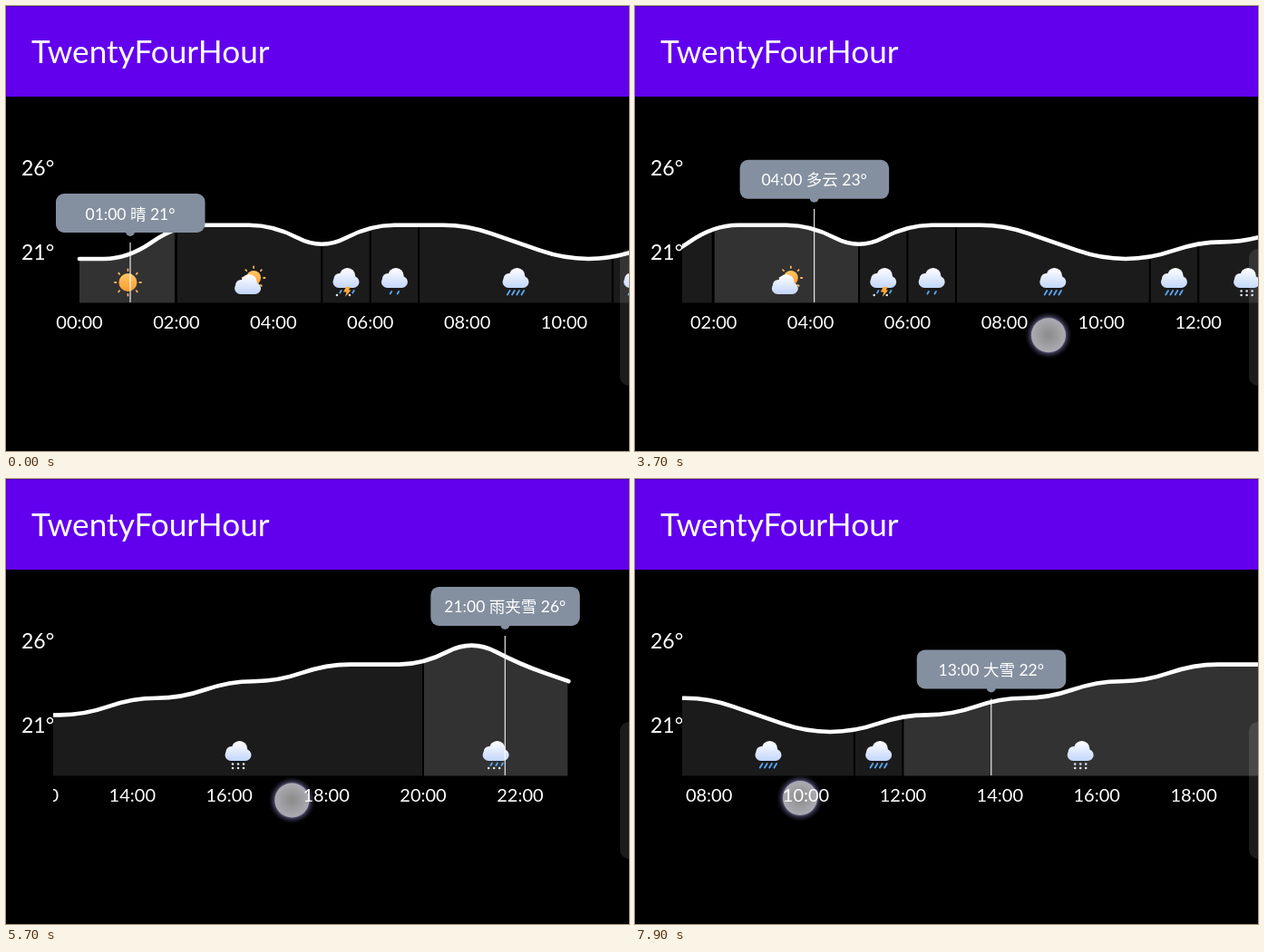
Write an HTML page with a canvas that moves like this. It is 687 px wide and 491 px high and loops after 8 s.

```html
<!DOCTYPE html>
<html lang="zh">
<head>
<meta charset="utf-8">
<style>
html, body { margin: 0; width: 100%; height: 100%; overflow: hidden; background: #000; }
canvas { display: block; }
</style>
</head>
<body>
<canvas id="stage" width="687" height="491"></canvas>
<script>
const ctx = document.getElementById('stage').getContext('2d');
const W = 687, H = 491, LEFT = 52, BASE = 327, HOUR = 53.45, ORIGIN = 81;
const LOOP = 8000, MAX_SCROLL = 690, TWEEN = 120;
const FONT = 'Lato, "Noto Sans CJK SC", "Noto Sans CJK", sans-serif';

// One digit per hour: half degrees above 21
const temps = [...'004441444200224466888b86'].map(c => 21 + parseInt(c, 36) / 2);
const sections = [
  [0, 2, '晴', sunny], [2, 5, '多云', cloudy], [5, 6, '雷阵雨', thunder],
  [6, 7, '小雨', drizzle], [7, 11, '中雨', rain], [11, 12, '大雨', rain],
  [12, 20, '大雪', snow], [20, 23, '雨夹雪', sleet]
];

const easeIn = k => k ** 3;
const easeOut = p => k => 1 - (1 - k) ** p;
const smooth = k => k * k * (3 - 2 * k);

// Touches move from (x, y) along legs [start, end, x, y, ease]
const tap = { from: 2600, to: 3200, x: 382, y: 384, legs: [[2600, 3200, 438, 390, easeIn]] };
const drag = { from: 3500, to: 5000, x: 560, y: 355, legs: [[3500, 4700, 52, 395, easeOut(1.25)]] };
const sweep = { from: 5200, to: 7600, x: 626, y: 322, legs: [
  [5200, 5750, 215, 365, easeIn], [5780, 6700, 471, 344, easeOut(2)], [6700, 7500, 693, 341, smooth]] };
const press = { from: 7900, to: LOOP, x: 182, y: 352, legs: [] };

const clamp = (v, a, b) => Math.max(a, Math.min(b, v));
const tempY = t => 279 - (t - 21) * 18.6;

function touchAt({ x, y, legs }, t) {
  for (const [start, end, toX, toY, ease] of legs) {
    const k = ease(clamp((t - start) / (end - start), 0, 1));
    x += (toX - x) * k;
    y += (toY - y) * k;
  }
  return [x, y];
}

function scrollAt(t) {
  if (t < sweep.from) return 0.973 * (drag.x - touchAt(drag, t)[0]);
  return clamp(1120 - touchAt(sweep, t)[0], 0, MAX_SCROLL);
}

const cursorX = s => 137 + 0.599 * s;
const hourAt = s => clamp(Math.floor((cursorX(s) + s - ORIGIN) / HOUR), 0, 23);

// A linear tween after each hour change is a moving average of the targets
function markerY(t) {
  let sum = 0;
  for (let i = 0; i < 30; i++) {
    const hour = hourAt(scrollAt(Math.max(0, t - (i + 0.5) * TWEEN / 30)));
    sum += tempY(Math.floor(temps[hour]));
  }
  return sum / 30 - 18;
}

function text(str, x, y, size, align = 'center') {
  ctx.font = size + 'px ' + FONT;
  ctx.textAlign = align;
  ctx.fillStyle = '#fff';
  ctx.fillText(str, x, y);
}

function box(x, y, w, h, r, fill) {
  ctx.fillStyle = fill;
  ctx.beginPath();
  ctx.roundRect(x, y, w, h, r);
  ctx.fill();
}

function dot(x, y, r, fill) {
  ctx.fillStyle = fill;
  ctx.beginPath();
  ctx.arc(x, y, r, 0, 7);
  ctx.fill();
}

function stroke(x1, y1, x2, y2, color, width) {
  ctx.strokeStyle = color;
  ctx.lineWidth = width;
  ctx.lineCap = 'round';
  ctx.beginPath();
  ctx.moveTo(x1, y1);
  ctx.lineTo(x2, y2);
  ctx.stroke();
}

function fade(y1, y2, top, bottom) {
  const g = ctx.createLinearGradient(0, y1, 0, y2);
  g.addColorStop(0, top);
  g.addColorStop(1, bottom);
  return g;
}

function sun(x, y, r) {
  dot(x, y, r, fade(y - r, y + r, '#ffc766', '#ff9a2e'));
  for (let i = 0; i < 8; i++) {
    const c = Math.cos(i * Math.PI / 4), s = Math.sin(i * Math.PI / 4);
    stroke(x + c * (r + 3), y + s * (r + 3), x + c * (r + 4.5), y + s * (r + 4.5), '#f5b461', 1.8);
  }
}

function cloud(x, y = 289) {
  const fill = fade(y, y + 22, '#ffffff', '#c3d6fb');
  box(x - 14.5, y + 9, 29, 13, 6.5, fill);
  dot(x + 1.5, y + 8.7, 8.7, fill);
  dot(x - 7.5, y + 12, 6, fill);
}

const drop = (x, y, len) => stroke(x + len * 0.3, y, x - len * 0.3, y + len, '#5aa5ee', 1.9);
const flake = (x, y) => dot(x, y, 1.3, '#dfe5ef');

function sunny(x) { sun(x, 305, 10); }
function cloudy(x) { sun(x + 5, 300, 8); cloud(x - 1.5, 296); }
function drizzle(x) {
  cloud(x);
  for (const d of [-4, 4]) drop(x + d, 315, 2.5);
}
function rain(x) {
  cloud(x);
  for (let i = -1.5; i < 2; i++) drop(x + i * 5.2, 314, 4.5);
}
function snow(x) {
  cloud(x);
  for (let i = -1; i < 2; i++) {
    flake(x + i * 6, 314.5);
    flake(x + i * 6, 319);
  }
}
function sleet(x) {
  cloud(x);
  for (let i = -1; i < 2; i++) {
    drop(x + i * 6 + 1, 313.5, 2.5);
    flake(x + i * 6 - 2, 319);
  }
}
function thunder(x) {
  cloud(x);
  for (const d of [-6, 8]) {
    drop(x + d, 314, 2.5);
    flake(x + d - 4, 319);
  }
  ctx.fillStyle = '#ffab3d';
  ctx.fill(new Path2D(`M${x} 310h5l-2 3.5h2.5l-6.5 7.5l1.5 -5.5h-3.5z`));
}

function curve(x0) {
  ctx.beginPath();
  ctx.moveTo(x0, tempY(temps[0]));
  for (let i = 0; i < 23; i++) {
    const x = x0 + i * HOUR, y = tempY(temps[i]);
    ctx.quadraticCurveTo(x, y, x + HOUR / 2, (y + tempY(temps[i + 1])) / 2);
  }
  ctx.lineTo(x0 + 23 * HOUR, tempY(temps[23]));
}

function drawTouch(t) {
  const touch = [tap, drag, sweep, press].find(g => t >= g.from && t < g.to);
  if (!touch) return;
  const [x, y] = touchAt(touch, t);
  const halo = ctx.createRadialGradient(x, y, 18, x, y, 26);
  halo.addColorStop(0, 'rgba(150,145,200,.75)');
  halo.addColorStop(0.4, 'rgba(80,78,115,.5)');
  halo.addColorStop(1, 'rgba(40,40,60,0)');
  dot(x, y, 26, halo);
  const core = ctx.createRadialGradient(x, y, 2, x, y, 19);
  core.addColorStop(0, '#8e8e8e');
  core.addColorStop(1, '#acabb2');
  dot(x, y, 19, core);
}

function inChart(paint) {
  ctx.save();
  ctx.beginPath();
  ctx.rect(LEFT, 101, W - LEFT, H);
  ctx.clip();
  paint();
  ctx.restore();
}

function drawChart(x0, active) {
  ctx.save();
  curve(x0);
  ctx.lineTo(x0 + 23 * HOUR, BASE + 0.5);
  ctx.lineTo(x0, BASE + 0.5);
  ctx.clip();
  for (const p of sections) {
    ctx.fillStyle = p === active ? '#323232' : '#1b1b1b';
    ctx.fillRect(x0 + p[0] * HOUR + (p[0] ? 1 : 0), 101, (p[1] - p[0]) * HOUR - 2, 300);
  }
  ctx.restore();

  curve(x0);
  ctx.strokeStyle = '#fff';
  ctx.lineWidth = 4.6;
  ctx.lineCap = ctx.lineJoin = 'round';
  ctx.stroke();

  // Icons sit in the middle of the visible part of their section
  for (const [from, to, , icon] of sections) {
    const a = x0 + from * HOUR, b = x0 + to * HOUR;
    const mid = (Math.max(a, LEFT) + Math.min(b, W)) / 2;
    const inset = Math.min(HOUR, (b - a) / 2);
    icon(clamp(mid, a + inset, b - inset));
  }
}

const clock = h => String(h).padStart(2, '0') + ':00';

function draw(t) {
  const s = scrollAt(t), x0 = ORIGIN - s, cx = cursorX(s), hour = hourAt(s);
  const active = sections.find(p => hour < p[1]);
  ctx.fillStyle = '#000';
  ctx.fillRect(0, 0, W, H);
  ctx.fillStyle = '#6200ee';
  ctx.fillRect(0, 0, W, 100);
  ctx.fillStyle = 'rgba(0,0,0,.25)';
  ctx.fillRect(0, 0, W, 1);
  text('TwentyFourHour', 28, 63, 35.2, 'left');
  text('26°', 17, 187, 23, 'left');
  text('21°', 17, 280, 23, 'left');

  inChart(() => drawChart(x0, active));
  drawTouch(t);
  inChart(() => {
    for (let h = 0; h < 24; h += 2) text(clock(h), x0 + h * HOUR, 356, 20);
  });

  const y = markerY(t), top = y - 54;
  ctx.fillStyle = 'rgba(255,255,255,.9)';
  ctx.fillRect(cx - 0.6, y, 1.2, BASE - y);
  dot(cx, top + 42, 5, '#8490a0');
  box(cx - 82, top, 164.5, 43, 9, '#8490a0');
  text(`${clock(hour)} ${active[2]} ${Math.floor(temps[hour])}°`, cx, top + 28.5, 17.5);

  box(677, 268, 40, 151, 10, 'rgba(255,255,255,.11)');
}

function frame() {
  draw(performance.now() % LOOP);
  requestAnimationFrame(frame);
}
frame();
</script>
</body>
</html>
```
